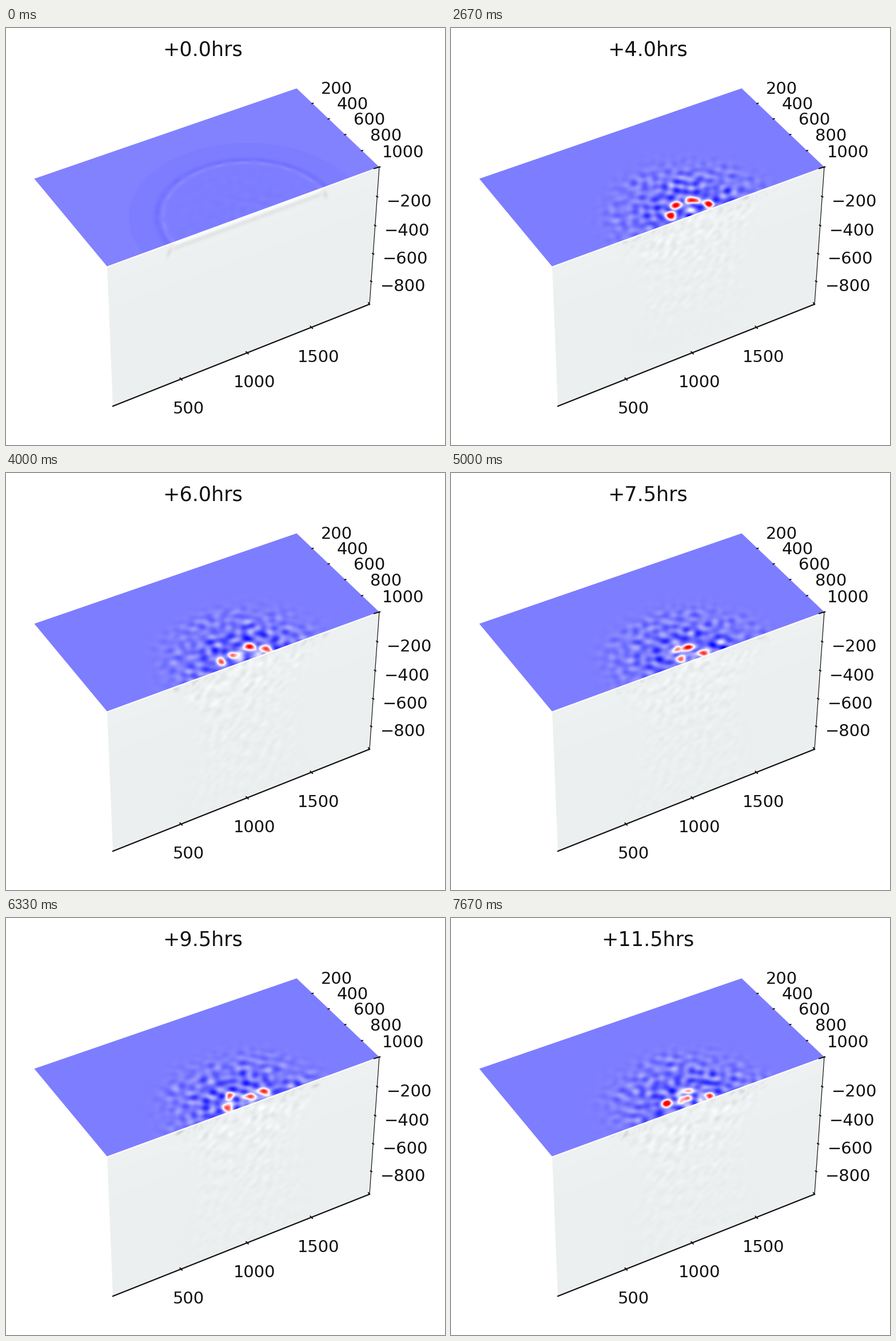
Write a matplotlib script that moves like this. It is 768 px wide and 729 px high and loops after 8000 ms.

```python
import numpy as np
import matplotlib.pyplot as plt
from matplotlib.animation import FuncAnimation
from matplotlib.patches import Polygon

W, H, DPI = 768, 729, 96
PT = 72 / DPI
STEPS, LOOP_MS, INTERVAL = 24, 8000, 100
INK = "#111111"

# Box size in metres and its corners on the stage
XMAX, YMAX, ZMAX = 1965, 1000, 970
XMID = 993
BACK_R, FRONT_R, FRONT_L, BACK_L = (508.5, 105.5), (653, 243), (177, 417), (49.5, 263.5)
LOW_R, LOW_L = (636, 483), (187, 661)
FRONT_BASE = np.array([236, 239, 239.])


def homography(src, dst):
    rows, rhs = [], []
    for (x, y), (u, v) in zip(src, dst):
        rows += [[x, y, 1, 0, 0, 0, -u * x, -u * y], [0, 0, 0, x, y, 1, -v * x, -v * y]]
        rhs += [u, v]
    return np.append(np.linalg.solve(np.array(rows, float), rhs), 1).reshape(3, 3)


def apply(m, x, y):
    a, b, w = np.tensordot(m, np.stack([x, y, np.ones_like(x)]), 1)
    return a / w, b / w


class Face:
    """A side of the box, given by its four corners on the stage."""

    def __init__(self, corners, a_max, b_max):
        plane = [(0, 0), (a_max, 0), (a_max, b_max), (0, b_max)]
        self.to_stage = homography(plane, corners)
        self.a, self.b = apply(homography(corners, plane), PX, PY)

    def project(self, a, b):
        return apply(self.to_stage, float(a), float(b))


class Waves:
    """Smooth random field, a sum of drifting plane waves."""

    def __init__(self, seed, short, long, count=48):
        rng = np.random.default_rng(seed)
        k = 2 * np.pi / rng.uniform(short, long, count)
        angle = rng.uniform(0, 2 * np.pi, count)
        self.k = np.stack([k * np.cos(angle), k * np.sin(angle)])
        self.phase = rng.uniform(0, 2 * np.pi, count)
        self.speed = rng.normal(0, .9, count)
        self.gain = np.sqrt(2 / count)

    def __call__(self, a, b, t):
        arg = np.stack([a, b], 1) @ self.k + self.phase + self.speed * t
        return self.gain * np.cos(arg).sum(1)


def sigmoid(x):
    return 1 / (1 + np.exp(-np.clip(x, -40, 40)))


def gauss(x, width):
    return np.exp(-(x / width) ** 2)


PX, PY = np.meshgrid(np.arange(W) + .5, np.arange(H) + .5)
SLOPE = (FRONT_R[1] - FRONT_L[1]) / (FRONT_R[0] - FRONT_L[0])
SPLIT = FRONT_L[1] + (PX - FRONT_L[0]) * SLOPE

top = Face([BACK_L, BACK_R, FRONT_R, FRONT_L], XMAX, YMAX)
front = Face([FRONT_L, FRONT_R, LOW_R, LOW_L], XMAX, ZMAX)
radius = np.hypot(top.a - XMID, top.b - YMAX)
is_top = (PY < SPLIT) & (PY > 95)
top_live = is_top & (radius < 700)
front_live = (PY >= SPLIT) & (abs(front.a - XMID) < 700) & (front.b < ZMAX + 10)

TX, TY, TR = top.a[top_live], top.b[top_live], radius[top_live]
T_ANGLE = np.arctan2(YMAX - TY, TX - XMID)
FX, FZ = front.a[front_live], front.b[front_live]
OFF_AXIS = abs(FX - XMID)

top_waves = Waves(4, 55, 120)
front_waves = Waves(9, 45, 120)
plume_rng = np.random.default_rng(3)
PLUMES = np.stack([XMID + plume_rng.uniform(-460, 420, 14), plume_rng.uniform(50, 330, 14)], 1)


def updrafts(t):
    """Clumps on a ring that closes in on the axis, then wander there."""
    ring = max(530 - 48 * t, 125)
    count = max(round(ring / 48), 4)
    settled = np.clip((t - 8) / 4, 0, 1)
    field = np.zeros_like(TR)
    for j in range(count):
        angle = np.pi * (j + .4) / count + .2 * settled * np.sin(.8 * t + 2 * j)
        r = ring * (1 + .35 * settled * np.sin(1.1 * t + 2.4 * j))
        power = 1 - (.1 + .3 * settled) * (1 + np.sin(1.9 * t + 1.7 * j)) / 2
        clump = gauss(TR - r, 30) * gauss((T_ANGLE - angle) * TR, 42)
        field = np.maximum(field, power * clump)
    return field


def top_values(t):
    value = np.full((H, W), .246)
    if t < 6:
        value[radius > 745 + 58 * t] += .009 if t < 1 else .005
    grow = np.clip(t / 4, .03, 1)
    noise = top_waves(TX, TY, t)
    local = grow * noise * (.022 + .06 * gauss(TR, 330)) * sigmoid((540 - TR) / 40)
    local -= .05 * grow * gauss(TR - 200, 120)

    start = max(0, 1 - t / 3)
    wobble = 1 + .25 * np.sin(TX / 17) * np.sin(TY / 23)
    local += start * wobble * (.026 * gauss(TR - 532, 16) - .022 * gauss(TR - 566, 22))

    heat = .33 * min(t / 4, 1) + .47 * np.clip((t - 4) / 3, 0, 1)
    hot = updrafts(t)
    value[top_live] += local * (1 - .6 * hot) + heat * hot * (1 + .12 * noise)
    return np.clip(value, 0, 1)


def front_colors(t):
    grow = min(t / 4, 1)
    noise = front_waves(FX, FZ, t)
    width = 530 - .75 * np.minimum(FZ, 300) + .2 * np.maximum(FZ - 300, 0)
    column = sigmoid((width - OFF_AXIS) / 45) * np.exp(-FZ / 560) * sigmoid((90 * t - FZ) / 70)
    light = 5 * grow * noise * column
    lip = gauss(FZ, 48) * sigmoid((570 - OFF_AXIS) / 25) * sigmoid((OFF_AXIS - 230) / 60)
    light -= 20 * grow * lip * np.maximum(noise, 0)
    pink = np.zeros_like(light)

    # Bright rim of the cooling disc, with a soft shadow and warm ends
    start = max(0, 1 - t / 3)
    if start:
        tube = sigmoid((538 - OFF_AXIS) / 8)
        ends = gauss(OFF_AXIS - 538, 22)
        light += start * (tube * (16 * gauss(FZ, 24) - 13 * gauss(FZ - 40, 18))
                          + 14 * ends * gauss(FZ, 25)
                          - 18 * gauss(OFF_AXIS - 550 - .3 * FZ, 16) * gauss(FZ - 55, 30))
        pink += start * 22 * ends * gauss(FZ - 10, 16)

    # Sinking plumes with dark tips
    sink = max(0, 1 - abs(t - 4) / 3)
    if sink:
        for x, z in PLUMES:
            dx, dz = FX - x, FZ - z - 40 * (t - 4)
            light += sink * (18 * gauss(dx, 20) * gauss(dz, 32)
                             - 30 * gauss(dx, 14) * gauss(dz - 44, 18))
            pink += sink * 14 * gauss(dx, 10) * gauss(dz, 15)
    rgb = np.clip(FRONT_BASE + light[:, None], 0, 255)
    rgb[:, 1:] -= pink[:, None]
    return rgb


def render(t):
    img = FRONT_BASE + 3 * np.exp(-np.clip(front.b, 0, None) / 250)[..., None]
    img[front_live] += front_colors(t) - FRONT_BASE
    v = top_values(t)[is_top]
    img[is_top] = 255 * np.stack([np.minimum(2 * v, 1), 1 - abs(2 * v - 1),
                                  np.minimum(2 - 2 * v, 1)], 1)
    return np.clip(img, 0, 255).astype(np.uint8)


def line(p, q, width, color=INK):
    ax.plot([p[0], q[0]], [p[1], q[1]], color=color, lw=width * PT, solid_capstyle="butt")


def label(text, x, baseline, size=29):
    return ax.text(x, baseline, text, fontsize=size * PT, color=INK, family="DejaVu Sans",
                   ha="center", va="baseline")


def tick(text, at, dash, offset):
    (x, y), (dx, dy) = at, dash
    line((x - dx, y - dy), (x + dx, y + dy), 2)
    label(text, x + offset[0], y + offset[1])


scenes = [render(t) for t in range(STEPS)]

fig = plt.figure(figsize=(W / DPI, H / DPI), dpi=DPI, facecolor="white")
ax = fig.add_axes([0, 0, 1, 1])
ax.axis("off")
image = ax.imshow(scenes[0], extent=(0, W, H, 0), interpolation="nearest", aspect="auto")
ax.set_xlim(0, W)
ax.set_ylim(H, 0)
outline = Polygon([BACK_L, BACK_R, FRONT_R, LOW_R, LOW_L, FRONT_L], transform=ax.transData)
image.set_clip_path(outline)

line((FRONT_L[0], FRONT_L[1] + .8), (FRONT_R[0], FRONT_R[1] + .8), 2.4, "#fbfbfb")
line((186, 661.5), (637, 482.5), 2.2)
line(FRONT_R, LOW_R, 1.2)
line((643, 246), (655, 242.5), 2)
line((633.5, 479.5), (636.5, 484), 2)

for x in range(500, 2000, 500):
    tick(f"{x}", front.project(x, ZMAX), (2.5, 2.5), (12.7, 60.5))
for y in range(200, 1200, 200):
    tick(f"{y}", top.project(XMAX, y), (2, -.6), (42, -17.3))
for z in range(200, 1000, 200):
    tick(f"−{z}", front.project(XMAX, z), (2, 1), (56, 17.6))
title = label("+0.0hrs", 344, 48, 35)


def update(n):
    # Half-hour steps, rounded to the nearest drawn moment
    t = int((n + .7) * INTERVAL * STEPS / LOOP_MS)
    image.set_data(scenes[t])
    title.set_text(f"+{t / 2:.1f}hrs")
    return image, title


anim = FuncAnimation(fig, update, frames=LOOP_MS // INTERVAL, interval=INTERVAL, repeat=True,
                     repeat_delay=0)
plt.show()
```
